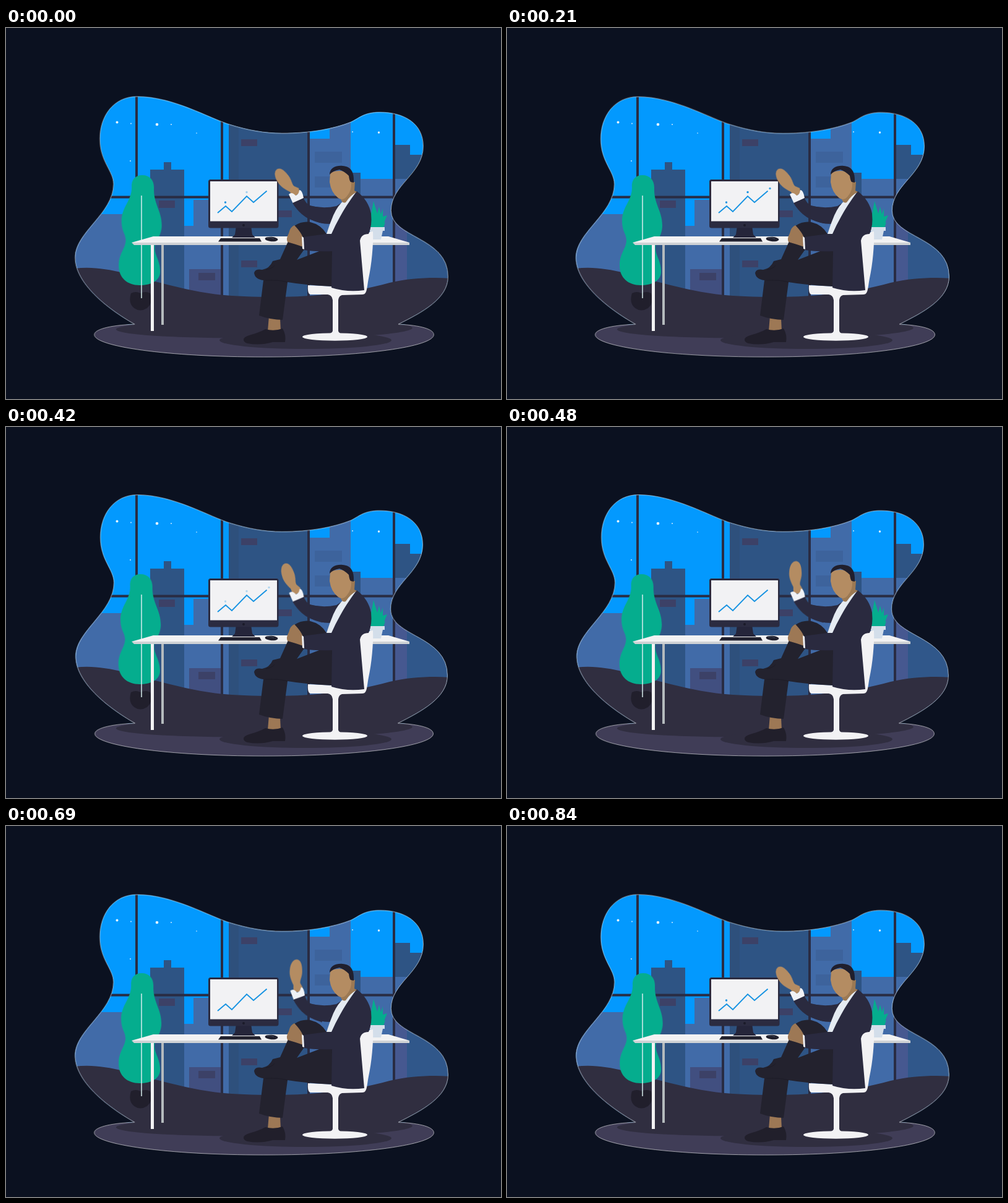
An HTML page for the animation above (870 ms loop, 800x600 px).

```html
<!DOCTYPE html>
<html lang="en">
<head>
<meta charset="utf-8">
<title>Evening at the office</title>
<style>
  html, body { margin: 0; width: 100%; height: 100%; overflow: hidden; background: #0b1120; }
  svg { display: block; width: 100vw; height: 100vh; }

  .pulse, .leaf, .forearm, .hand, .dot { animation: 870ms linear infinite; }

  .pulse { transform-origin: 417px 480px; animation-name: pulse; animation-timing-function: ease-in-out; }
  @keyframes pulse {
    0%, 100% { transform: scale(.9995, 1.0005); }
    26% { transform: scale(1.0025, .9975); }
    77% { transform: scale(.9975, 1.0025); }
  }

  .leaf { transform-origin: 218px 416px; animation-name: sway; animation-timing-function: ease-in-out; }
  @keyframes sway {
    0%, 100% { transform: skewX(-.4deg); }
    50% { transform: skewX(.5deg); }
  }

  .forearm { transform-origin: 492px 300px; animation-name: lift; }
  @keyframes lift {
    0%, 37.93% { transform: rotate(0deg); }
    55.17% { transform: rotate(1.5deg); }
    68.97% { transform: rotate(4deg); }
    86.2% { transform: rotate(4.5deg); }
    96.55%, 100% { transform: rotate(0deg); }
  }

  .hand { transform-origin: 469px 267px; animation-name: wave; }
  @keyframes wave {
    0%, 37.93% { transform: rotate(-37deg); animation-timing-function: ease-in-out; }
    62.07%, 68.97% { transform: rotate(4deg); animation-timing-function: ease-in; }
    96.55%, 100% { transform: rotate(-37deg); }
  }

  .d1 { animation-name: first; }
  .d2 { animation-name: second; }
  .d3 { animation-name: third; }
  @keyframes first {
    0%, 42% { opacity: 1; }
    51%, 83% { opacity: 0; }
    93%, 100% { opacity: 1; }
  }
  @keyframes second {
    0% { opacity: .35; }
    7%, 42% { opacity: 1; }
    51%, 97% { opacity: 0; }
    100% { opacity: .35; }
  }
  @keyframes third {
    0%, 16% { opacity: 0; }
    26%, 42% { opacity: 1; }
    51%, 100% { opacity: 0; }
  }
</style>
</head>
<body>
<svg viewBox="0 0 800 600">
  <defs>
    <path id="blob" class="pulse" d="M208 479 C162 453 112 412 112 371 C112 330 174 300 174 252
      C174 231 152 216 152 179 C152 142 174 110.500 212 110.500 C270 110.500 329 146 362 156
      C391 165 418 170 446 170 C490 170 529 163 557 152 C570 146 578 136 604 136
      C643 136 674 154 674 191 C674 236 622 253 622 295 C622 340 714 337 714 402
      C714 438 672 460 634 479 C670 481 691 487 691 496 C691 515 580 532 417 532
      C260 532 143 515 143 496 C143 488 165 481 208 479 Z"/>
    <clipPath id="clip"><use href="#blob"/></clipPath>
  </defs>

  <rect width="800" height="600" fill="#0b1120"/>

  <g clip-path="url(#clip)">
    <rect x="100" y="100" width="630" height="380" fill="#0399fe"/>

    <g fill="#e4f5ff">
      <circle cx="179.500" cy="152.500" r="2"/>
      <circle cx="202" cy="154.500" r=".9"/>
      <circle cx="244" cy="156" r="2.300"/>
      <circle cx="267" cy="156" r=".9"/>
      <circle cx="308" cy="170" r=".8"/>
      <circle cx="201" cy="215" r=".9"/>
      <circle cx="560" cy="168" r=".9"/>
      <circle cx="602.500" cy="169" r="1.700"/>
    </g>

    <!-- skyline -->
    <path fill="#416ba8" d="M100 301H233V450H100Z M288 320H303V278H350V450H288Z M349 290H360V450H349Z
      M490 179H523V150H557V450H490Z"/>
    <path fill="#2e5484" d="M233 229H255V217H267V229H288V450H233Z M376 140H490V450H376Z
      M557 234H573V450H557Z M628 189H653V205H720V450H628Z"/>
    <path fill="#2e507c" d="M360 140H376V450H360Z"/>
    <path fill="#416ba8" d="M573 244H720V300H648V450H573Z"/>
    <path fill="#30578a" d="M648 300H720V450H648Z"/>
    <path fill="#465890" d="M628 300H648V450H628Z"/>
    <path fill="#414f80" d="M296 390H348V450H296Z"/>
    <path fill="#3c4167" d="M311 396h27v12h-27z M247 279h26v12h-26z M380 180h26v11h-26z
      M436 295h26v11h-26z M380 376h26v11h-26z"/>
    <path fill="#3d639c" d="M499 200h44v18h-44z M499 240h44v18h-44z"/>

    <!-- window frame -->
    <path stroke="#292c43" stroke-width="4" fill="none"
      d="M211 100V450 M349 100V450 M489 100V450 M627 100V450 M150 273.500H680"/>

    <!-- floor -->
    <rect x="130" y="470" width="580" height="70" fill="#403d57"/>
    <path fill="#302e40" d="M100 391 C150 380 200 400 245 411 C290 422 325 432 385 434
      C480 438 560 429 620 412 C655 404 690 403 720 405 V470 L634 479
      C690 484 652 502 417 502 C285 502 185 497 178 488 C176 484 195 482 208 479 L100 440 Z"/>
    <ellipse cx="484" cy="505" rx="139" ry="14" fill="#302e40"/>
  </g>
  <use href="#blob" fill="none" stroke="#fff" stroke-width=".9" stroke-opacity=".65"/>

  <!-- tall plant -->
  <path fill="#211f2c" d="M202 429 Q210 425 217 429 Q226 425 233 429 Q238 445 228 453 Q217 460 207 453 Q197 445 202 429Z"/>
  <path class="leaf" fill="#05ad8e" d="M219 238 C231 238 238 246 238 258 C237 285 251 295 251 319
    C251 338 240 343 240 356 C240 368 249 376 249 394 C249 409 234 416 216 416
    C196 416 182 404 182 384 C182 364 193 357 193 343 C193 333 186 329 186 312
    C186 289 202 280 202 258 C201 246 207 238 219 238Z"/>
  <path d="M219 271V437" stroke="#d9eeee" stroke-width="1.500"/>

  <!-- small plant -->
  <path fill="#05ad8e" d="M586 323 L586 292 L590 301 L594 280 L600 300 L603 289 L606 301
    L609 292 L609 305 L616 303 L611 315 L613 314 L610 323Z"/>

  <!-- desk -->
  <path fill="#b4babd" d="M251 350h4v130h-4z"/>
  <path fill="#f2f2f3" d="M234 350h5v140h-5z M238 337 H618 L652 347 H203Z"/>
  <path fill="#cfd2d5" d="M203 347H652V351H207Z"/>
  <path fill="#d3deea" d="M587 322H612V328H609L606 342H591L588 328Z"/>

  <!-- computer -->
  <path fill="#25253a" d="M372 320H396L398 334L403 339H365L370 334Z"/>
  <rect x="327" y="245" width="113.500" height="78.500" rx="3.500" fill="#2b2b40"/>
  <rect x="330" y="248" width="108" height="64.500" fill="#f2f2f4"/>
  <circle cx="384" cy="319" r="2" fill="#1b1b29"/>
  <path fill="#22222f" d="M347 340H410L413 345.500H343Z"/>
  <ellipse cx="429" cy="341.500" rx="10.500" ry="3.700" fill="#20202d" transform="rotate(4 429 341.500)"/>
  <path d="M422 339.500Q428 337.500 433 341" fill="none" stroke="#4a5365" stroke-width=".8"/>
  <polyline points="342,299 355,288 365,297 389,272 400,282 421.500,263.500" fill="none" stroke="#1693e2" stroke-width="1.900"/>
  <g fill="#1693e2">
    <circle class="dot d1" cx="354.500" cy="282" r="1.700"/>
    <circle class="dot d2" cx="389" cy="265.500" r="1.700"/>
    <circle class="dot d3" cx="425" cy="259.500" r="1.700"/>
  </g>

  <!-- chair -->
  <g fill="#f2f2f4">
    <path d="M572 343 C573 333 583 331 593 329 C594 350 591 382 586 405 C583 420 584 431 576 431
      L543 432 Q538 433 537 440 L537 490 Q538 494 546 496 H517 Q527 494 528 490
      L528 440 Q527 432 520 431 L492 431 Q487 430 488 416 L530 418 L570 415Z"/>
    <ellipse cx="531.500" cy="499.500" rx="52.500" ry="6.300"/>
  </g>

  <!-- legs -->
  <path fill="#9d7855" d="M425 466L443 470L444 490H423Z"/>
  <path fill="#211f2b" d="M384 504 C385 496 402 497 419 487 Q433 491 447 486 Q453 496 451 508
    L431 508 Q410 514 390 510 Q384 508 384 504Z"/>
  <path fill="#23222e" fill-rule="evenodd" d="M466 320 Q478 312 492 314 Q509 318 518 333 L530 362 L528 418
    Q485 416 455 411 L447 472 Q428 472 409 465 L416 408 Q402 406 401 396
    Q403 389 414 391 Q426 389 431 377 L443 374 L456 345Z
    M482 358 L506 361 L470 375Z"/>
  <path d="M434 384Q431 389 420 391M455 411Q440 407 419 408" fill="none" stroke="#1d1c27"/>
  <path fill="#9d7855" d="M466 319 C472 325 479 334 480 340 L480 354 Q466 349 455 346
    Q452 341 457 332 Q459 322 466 319Z"/>

  <!-- waving arm -->
  <g class="forearm">
    <path class="hand" fill="#b48c62" d="M462 270 L462 259 C457 249 455 242 456 234
      C457 223 462 217 468 217.500 C475 219 476 229 476 237 C476 246 472 251 473 256
      L477 263 L474 270Z"/>
    <path fill="#f0f2f6" d="M457 269 Q462 264 468 271 Q473 270 474 262 Q479 262 481 275 L464 284Z"/>
    <path fill="#2a2a3f" d="M463 283 L481 275 Q484 284 493 288 L512 291 L512 316 Q489 311 478 301 Q469 293 463 283Z"/>
  </g>

  <!-- torso -->
  <path fill="#2a2a3f" d="M491 287 Q512 293 534 288 L551 277 L567 264 Q586 279 590 300
    Q592 320 586 333 Q574 333 572 344 L579 424 Q552 428 526 420 L527 361
    Q500 362 481 359 L480 338 L518 333 L524 317 Q505 317 490 308Z"/>
  <path fill="#e5ebf2" d="M547 278 L566 265 Q549 288 540 305 Q532 319 526 333 L518 333 Q523 317 529 303 Q536 287 547 278Z"/>
  <path fill="#f0f2f6" d="M478 337L481 339L482 358L479 357Z"/>

  <!-- head -->
  <path fill="#9c7953" d="M540 272 L556 249 H564 L563 263 L567 265 Q557 270 549 282 Q542 285 540 272Z"/>
  <path fill="#b48c62" d="M524 234 Q540 227 556 236 L558 249 Q559 263 551 272 Q545 280 537 275
    Q525 266 523 249Z"/>
  <path fill="#201f2d" d="M523 237 C523 226 534 222 544 223 C557 224 563 232 562 250
    L557 249 Q555 247 554 239 Q547 232 539 229 Q528 231 523 237Z"/>
</svg>
</body>
</html>
```
